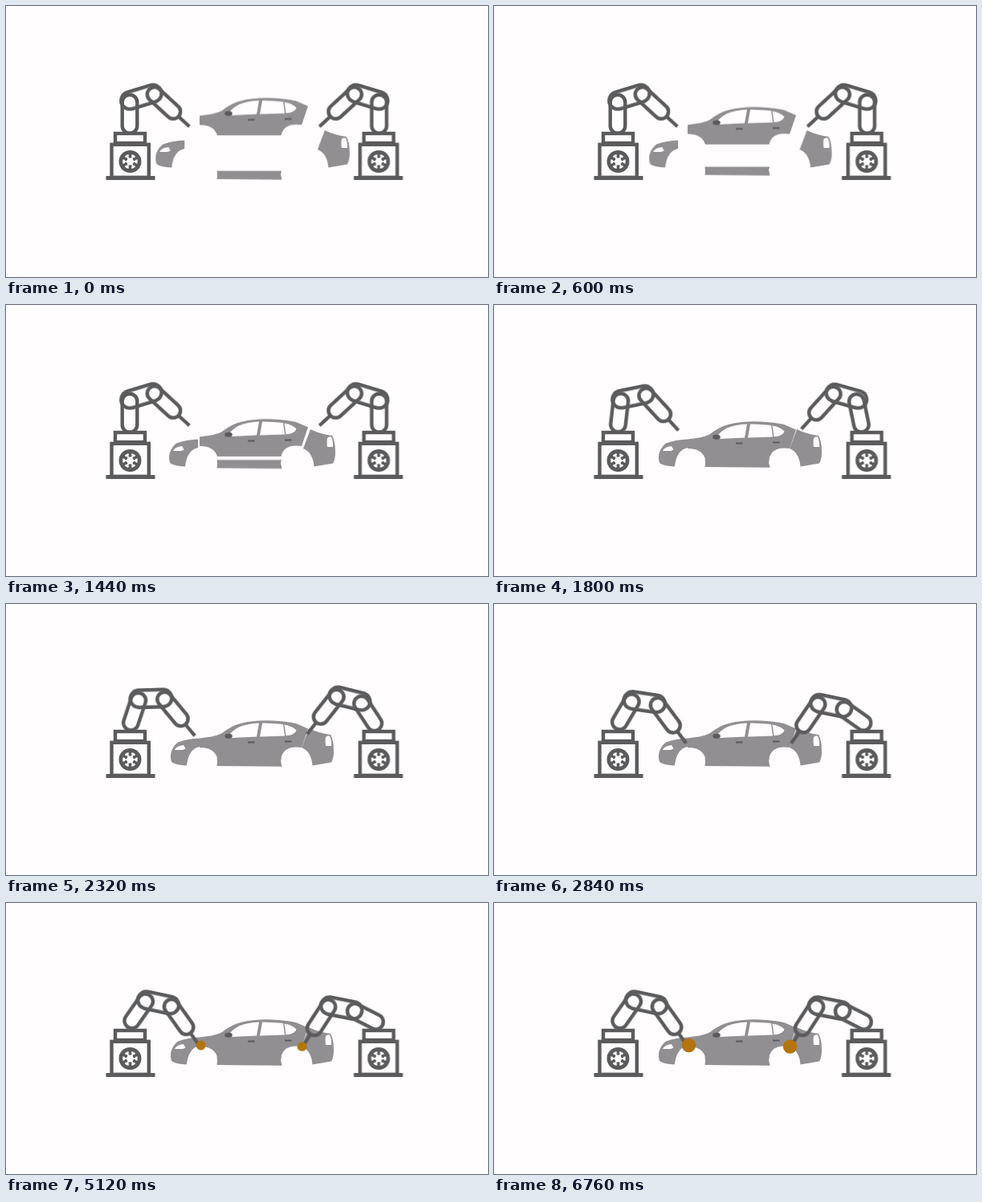
Animation of 600 by 338 pixels, one loop 7.6 s. Source, as an HTML page without scripts:

```html
<!DOCTYPE html>
<html lang="en">
<head>
<meta charset="utf-8">
<title>Assembly line</title>
<style>
  html, body { margin: 0; width: 100%; height: 100%; overflow: hidden; background: #fffdfe; }
  svg { display: block; width: 600px; height: 338px; }

  .metal { fill: none; stroke: #5b5a5c; stroke-width: 4.4; }
  .dark { fill: #5b5a5c; }
  .paint { fill: #918f92; }
  .light { fill: #fffdfe; }
  .spark { fill: #b4740e; }

  /* Car panels slide in from --x, --y */
  .panel { animation: join 7600ms linear infinite; }
  @keyframes join {
    0% { transform: translate(var(--x, 0px), var(--y, 0px)); }
    21.05%, 100% { transform: none; }
  }

  /* Each arm link snaps to its starting pose, then turns by --turn about its joint */
  .link {
    --x0: 0px; --turn0: 0deg; --x: 0px; --y: 0px;
    animation: reach 7600ms linear infinite;
  }
  .upper { transform-origin: 154px 149px; }
  .fore { transform-origin: 154px 118px; }
  .hand { transform-origin: 183.5px 109px; --turn0: 3deg; }
  @keyframes reach {
    0%, 20% { transform: translate(0px, 0px) rotate(0deg); }
    20.01% { transform: translate(var(--x0), 0px) rotate(var(--turn0)); }
    40%, 100% { transform: translate(var(--x), var(--y)) rotate(var(--turn)); }
  }
  .left .upper { --x: 3px; --y: -2.5px; --turn: 35deg; }
  .left .fore { --turn: -5.8deg; }
  .left .hand { --turn: -17.3deg; }
  .left .hand, .right .hand { --turn0: 3deg; }
  .right .upper { --x0: 8px; --x: 4.5px; --y: -1px; --turn: 63deg; }
  .right .fore { --x0: -3px; --turn: -57deg; }
  .right .hand { --turn: 8.4deg; }

  .spark { transform-box: fill-box; transform-origin: center; animation: glow 7600ms infinite; }
  @keyframes glow {
    0% { transform: scale(0); animation-timing-function: step-end; }
    48.94% { transform: scale(.53); animation-timing-function: linear; }
    55.8% { transform: scale(.56); animation-timing-function: ease-in-out; }
    87.4%, 100% { transform: scale(1); }
  }
</style>
</head>
<body>
<svg viewBox="0 0 600 338">
  <defs>
    <g id="base">
      <rect class="metal" x="136" y="159" width="37" height="12"/>
      <rect class="metal" x="131.5" y="172.8" width="46.3" height="41"/>
      <rect class="dark" x="124.5" y="212" width="61" height="5"/>
      <circle class="dark" cx="154.5" cy="194" r="14"/>
      <circle class="light" cx="154.5" cy="194" r="4.4"/>
      <g fill="none" stroke="#fffdfe">
        <circle cx="154.5" cy="194" r="8" stroke-width="2.6" pathLength="60" stroke-dasharray="5.6 4.4" stroke-dashoffset="2.8"/>
        <path id="spoke" stroke-width="2" d="M146.5 194h16"/>
        <use href="#spoke" transform="rotate(60 154.5 194)"/>
        <use href="#spoke" transform="rotate(120 154.5 194)"/>
      </g>
    </g>
    <g id="arm" class="metal link upper">
      <rect x="144.7" y="110.7" width="18.6" height="48" rx="9.3"/>
      <g class="link fore">
        <rect x="143.3" y="107.3" width="51.7" height="21.4" rx="10.7" transform="rotate(-17 154 118)"/>
        <g class="link hand">
          <g transform="rotate(42.7 183.5 109)">
            <rect x="176.3" y="100" width="49.7" height="18" rx="9"/>
            <path d="M226 109h18.5"/>
          </g>
        </g>
      </g>
    </g>
  </defs>

  <g class="paint">
    <g class="panel" style="--y:-31px">
      <path d="M241 167.500 252 166Q262 164.500 269 161Q281 151.500 292 149Q310 144.500 332 145.500Q348 146 361 149L376 155.500 368 179Q346 176 342.500 192H263Q259 179 241 179Z"/>
      <path class="light" d="M276 166Q281 158 290 153.500Q301 149 315 148.500L312 165.500 281 167Z"/>
      <path class="light" d="M319 148.500Q333 148.500 345 150L347 164.500 316 165.500Z"/>
      <path class="light" d="M346.500 150.500Q356 152 361.500 157.500Q360 162 353 163.700L348.500 164.200Z"/>
      <ellipse class="dark" cx="277" cy="164.800" rx="4.800" ry="3"/>
      <path class="dark" d="M301 171.500h8.500v2h-8.500zM347 170.500h8.500v2h-8.500z"/>
    </g>
    <g class="panel" style="--x:-19px">
      <path d="M241 167.500V178Q227 181 225 201.500Q212 201 206.500 197.500Q204 192 205.500 185Q208 177 214 172.500Q226 168 241 167.500Z"/>
      <path class="light" d="M210 182Q212 177 221 176L223.500 180.500 220 182Z"/>
    </g>
    <g class="panel" style="--x:20px">
      <path d="M377 155Q389 161 404 163Q408 170 408 184Q408 192 405 197.500L381.500 201.500Q380 184 368 179Z"/>
      <path class="light" d="M398 166Q400.500 163.500 403 164.700Q405.500 170 405 177H398Q397 170 398 166Z"/>
    </g>
    <path class="panel" style="--y:14px" d="M262.500 191.800H343L342 196 343.500 202.700 262.500 202Q263.500 197 262.500 191.800Z"/>
  </g>

  <g class="left">
    <use href="#base"/>
    <g class="metal link upper">
      <rect x="144.7" y="110.7" width="18.6" height="48" rx="9.3"/>
      <g class="link fore">
        <rect id="foreShape" x="143.3" y="107.3" width="51.7" height="21.4" rx="10.7" transform="rotate(-17 154 118)"/>
        <g class="link hand">
          <g id="handShape" transform="rotate(42.7 183.5 109)">
            <rect x="176.3" y="100" width="49.7" height="18" rx="9"/>
            <path d="M226 109h18.5"/>
          </g>
        </g>
      </g>
    </g>
  </g>
  <g class="right" transform="matrix(-1 0 0 1 618.5 0)">
    <use href="#base"/>
    <g class="metal link upper">
      <rect x="144.7" y="110.7" width="18.6" height="48" rx="9.3"/>
      <g class="link fore">
        <use href="#foreShape"/>
        <g class="link hand"><use href="#handShape"/></g>
      </g>
    </g>
  </g>

  <circle class="spark" cx="242.500" cy="177.500" r="8.700"/>
  <circle class="spark" cx="368.500" cy="179" r="8.700"/>
</svg>
</body>
</html>
```
